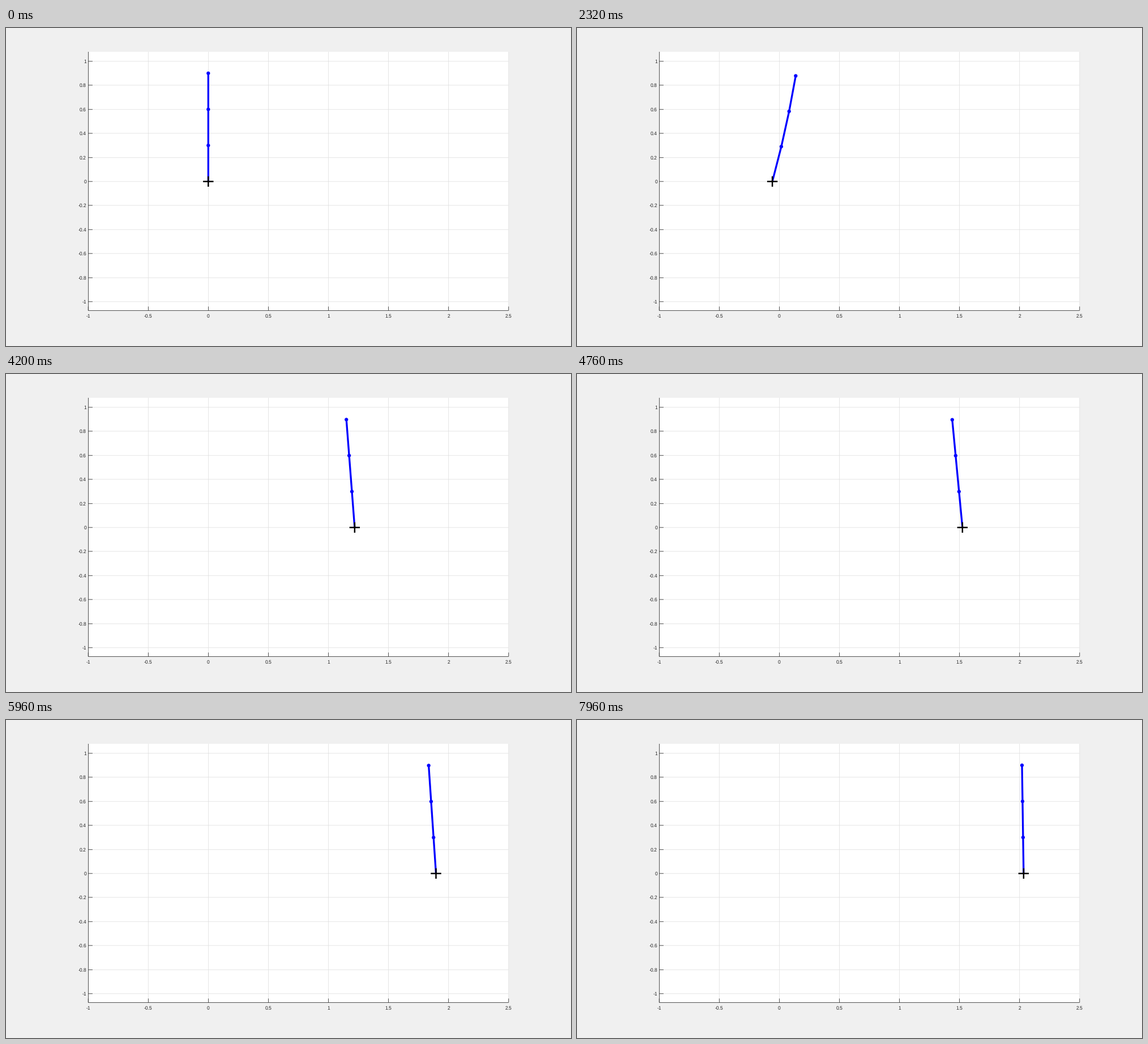
Write a matplotlib script that moves like this. It is 998 px wide and 561 px high and loops after 8 s.

```python
import math

import numpy as np
import matplotlib.pyplot as plt
from matplotlib.animation import FuncAnimation
from matplotlib.patches import Circle, Rectangle

W, H, DPI = 998, 561, 64
PX = 72 / DPI                      # points per pixel
FRAMES, INTERVAL = 200, 40
HAIR = 0.78                        # thickness of axis and grid lines
UNIT = 272 * HAIR                  # one axis unit in pixels
LEFT, RIGHT, TOP, BOTTOM = 145.4, 887.6, 42, 498.4
ZERO_X, ZERO_Y = 357.4, 270.8
LINK = 0.3 * UNIT
INK, GRID, BLUE = "#262626", "#dfdfdf", "#0000ff"
START, TRAVEL = 0.96, 432.7        # start of motion (s), way of the cart (px)

plt.rcParams["font.family"] = "Liberation Sans"
plt.rcParams["text.hinting"] = "none"
fig = plt.figure(figsize=(W / DPI, H / DPI), dpi=DPI, facecolor="#f0f0f0")
ax = fig.add_axes([0, 0, 1, 1])
ax.set_xlim(0, W)
ax.set_ylim(H, 0)
ax.axis("off")


def line(xs, ys, color, width=HAIR, **kw):
    return ax.plot(xs, ys, color=color, lw=width * PX, snap=False,
                   solid_capstyle="butt", **kw)[0]


def label(x, y, value, align):
    ax.text(x, y, f"{value:g}", color=INK, fontsize=8.5 * PX,
            ha=align, va="baseline")


def draw_axes():
    ax.add_patch(Rectangle((LEFT, TOP), RIGHT - LEFT, BOTTOM - TOP,
                           facecolor="white", lw=0))
    x_ticks = [(k / 2, ZERO_X + k / 2 * UNIT) for k in range(-2, 6)]
    y_ticks = [(k / 5, ZERO_Y - round(k / 5 * 272) * HAIR * H / W * 16 / 9)
               for k in range(-5, 6)]
    for _, x in x_ticks:
        line([x, x], [TOP, BOTTOM], GRID)
    for _, y in y_ticks:
        line([LEFT, RIGHT], [y, y], GRID)
    line([LEFT, LEFT], [TOP, BOTTOM], INK)
    line([LEFT, RIGHT], [BOTTOM, BOTTOM], INK)
    for value, x in x_ticks:
        line([x, x], [BOTTOM - 7, BOTTOM], INK)
        label(x - 0.2, 511.3, value, "center")
    for value, y in y_ticks:
        line([LEFT, LEFT + 7.5], [y, y], INK)
        label(142, y + 3.2, value, "right")


def bell(t, center, width):
    return math.exp(-((t - center) / width) ** 2)


def pose(t):
    """Cart position, lean of the tip and bend of the inner joints."""
    onset = 1 - bell(max(t, START), START, 0.42)
    swing = 45.5 * bell(t, 2.31, 0.95)
    recovery = 18.2 / math.cosh(0.83 * (t - 4.9))
    lean = onset * (swing - recovery)
    bend = onset * 2.8 * bell(t, 2, 0.6)
    # The point two thirds up the rod glides; the cart swings below it.
    glide = 1 - math.exp(-(0.404 * max(t - 1.93, 0)) ** 1.8)
    cart = ZERO_X - 0.1 + TRAVEL * glide - lean * 2 / 3
    return cart, lean, bend


draw_axes()
rod = line([], [], BLUE, 3.3, zorder=3)
joints = [ax.add_patch(Circle((0, 0), 3.15, color=BLUE, lw=0, zorder=3))
          for _ in range(3)]
cross = [line([], [], "black", 2.5, zorder=4) for _ in range(2)]


def update(frame):
    cart, lean, bend = pose(frame * INTERVAL / 1000)
    xs = cart + np.array([0, lean / 3 + bend, lean * 2 / 3 + bend, lean])
    rises = np.sqrt(LINK ** 2 - np.diff(xs) ** 2)
    ys = ZERO_Y - np.concatenate([[0], np.cumsum(rises)])
    rod.set_data(xs, ys)
    for joint, x, y in zip(joints, xs[1:], ys[1:]):
        joint.center = x, y
    cross[0].set_data([cart - 9.2, cart + 9.2], [ZERO_Y, ZERO_Y])
    cross[1].set_data([cart, cart], [ZERO_Y - 9.2, ZERO_Y + 9.2])
    return [rod, *joints, *cross]


anim = FuncAnimation(fig, update, frames=FRAMES, interval=INTERVAL,
                     repeat=True, repeat_delay=0, blit=False)
plt.show()
```
